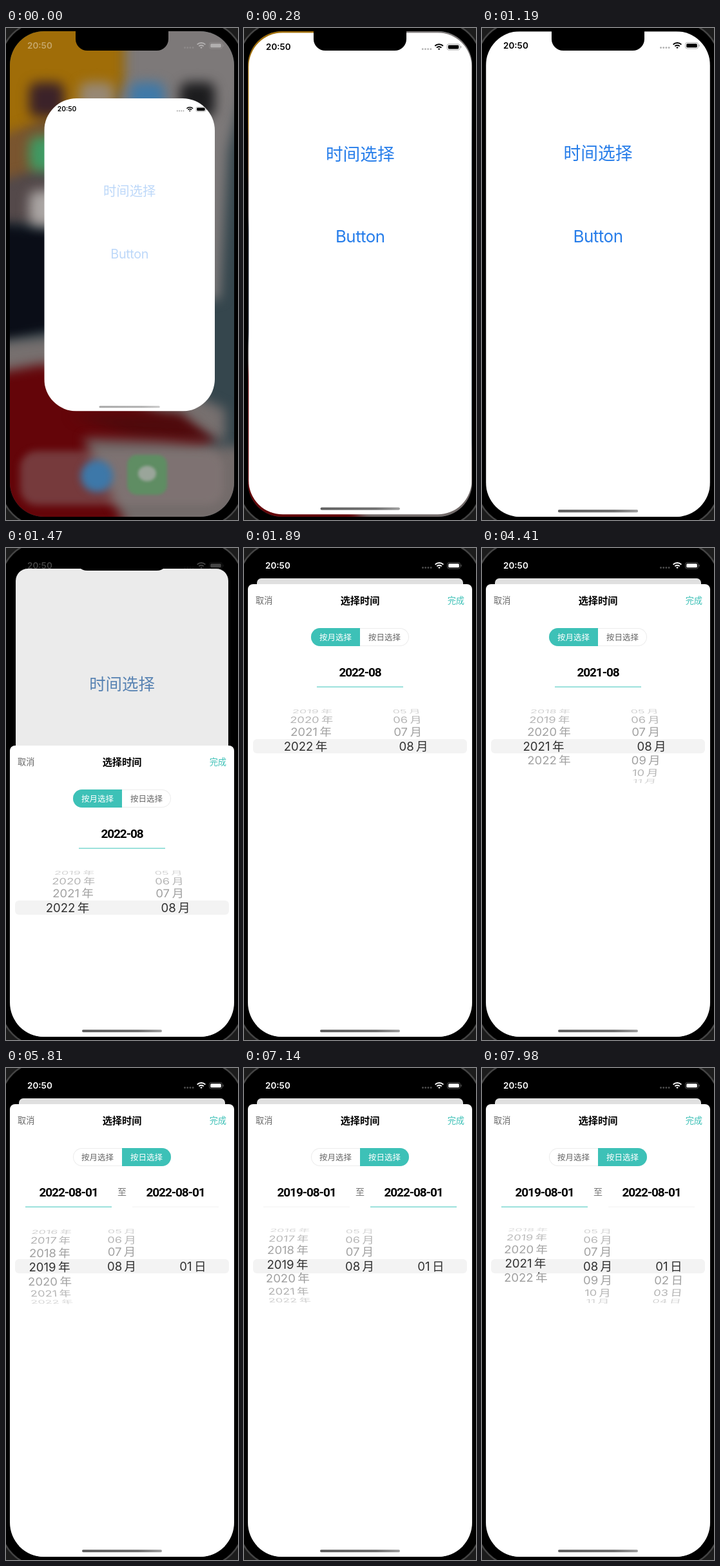
Write an HTML page with a canvas that moves like this. It is 360 px wide and 762 px high and loops after 8000 ms.

```html
<!DOCTYPE html>
<html lang="zh">
<head>
<meta charset="utf-8">
<title>时间选择</title>
<style>
  html, body { margin: 0; height: 100%; overflow: hidden; background: #000; }
  canvas { display: block; }
</style>
</head>
<body>
<canvas id="stage" width="360" height="762"></canvas>
<script>
const ctx = document.getElementById('stage').getContext('2d');
const LOOP = 8000, STEP = 70;
const TEAL = '#3dc1b7', BLUE = [38, 125, 234];
const SANS = 'Inter, "Noto Sans CJK SC", "Noto Sans CJK", sans-serif';
const NUMERIC = 'Roboto, sans-serif';

const clamp = v => Math.min(1, Math.max(0, v));
const lerp = (a, b, p) => a + (b - a) * p;
const smooth = u => u * u * (3 - 2 * u);
const within = (t, a, b) => t >= a && t < b;
const pad = n => String(n).padStart(2, '0');

// Critically damped spring, normalised to reach 1 at u = 1
const damped = x => 1 - (1 + x) * Math.exp(-x);
const spring = u => damped(5.04 * clamp(u)) / damped(5.04);

function text(str, x, y, size, color, { weight = 400, family = SANS, align = 'center', spacing = 0 } = {}) {
  ctx.font = `${weight} ${size}px ${family}`;
  ctx.letterSpacing = spacing + 'px';
  ctx.textAlign = align;
  ctx.fillStyle = color;
  ctx.fillText(str, x, y + size * 0.365);
}

function box(x, y, w, h, r, color) {
  ctx.beginPath();
  ctx.roundRect(x, y, w, h, r);
  ctx.fillStyle = color;
  ctx.fill();
}

function blob(x, y, rx, ry, color) {
  ctx.beginPath();
  ctx.ellipse(x, y, rx, ry, 0, 0, 7);
  ctx.fillStyle = color;
  ctx.fill();
}

function polygon(color, ...points) {
  ctx.beginPath();
  for (let i = 0; i < points.length; i += 2) ctx.lineTo(points[i], points[i + 1]);
  ctx.fillStyle = color;
  ctx.fill();
}

function statusBar(color, alpha = 1) {
  ctx.save();
  ctx.globalAlpha = alpha;
  text('20:50', 33, 27, 13.5, color, { weight: 600, align: 'left' });
  ctx.globalAlpha = alpha * 0.3;
  for (let i = 0; i < 4; i++) blob(277.5 + i * 4.2, 30.5, 1.4, 1.4, color);
  ctx.strokeStyle = color;
  ctx.lineWidth = 1;
  ctx.beginPath();
  ctx.roundRect(315.5, 22.5, 20, 9.5, 3);
  ctx.stroke();
  box(336.5, 25.5, 1.3, 3.5, 1, color);
  ctx.globalAlpha = alpha;
  box(317.2, 24.2, 16.6, 6.1, 1.5, color);
  ctx.lineWidth = 2;
  for (const r of [1.5, 5.2, 9]) {
    ctx.beginPath();
    ctx.arc(303, 32, r, -Math.PI * 0.75, -Math.PI * 0.25);
    ctx.stroke();
  }
  ctx.restore();
}

function homeIndicator(x, y, scale = 1) {
  const w = 124 * scale;
  const shade = ctx.createLinearGradient(x - w / 2, 0, x + w / 2, 0);
  shade.addColorStop(0, '#606060');
  shade.addColorStop(0.7, '#707070');
  shade.addColorStop(1, '#a0a0a0');
  box(x - w / 2, y - 2 * scale, w, 4 * scale, 2 * scale, shade);
}

function homeScreen() {
  box(0, 0, 360, 762, 0, '#35464d');
  ctx.save();
  ctx.filter = 'blur(9px)';
  polygon('#7d7979', 170, -20, 380, -20, 375, 60, 345, 190, 332, 420, 300, 420, 170, 200);
  polygon('#a06d08', -20, -20, 184, -20, 184, 80, 150, 150, 60, 150, -20, 200);
  polygon('#7a552f', -20, 170, 70, 140, 70, 220, -20, 260);
  polygon('#54494a', -20, 240, 70, 215, 70, 300, -20, 310);
  polygon('#0a0d17', -20, 300, 90, 315, 90, 465, -20, 490);
  polygon('#77706f', -20, 488, 80, 478, 340, 590, 340, 640, 200, 610, -20, 545);
  polygon('#640509', -20, 535, 60, 520, 200, 580, 325, 640, 300, 660, 250, 780, -20, 780);
  polygon('#4f0a0c', 100, 600, 270, 595, 320, 640, 200, 632);
  polygon('#736b6a', 120, 636, 240, 640, 380, 650, 380, 780, 190, 780);
  box(36, 84, 54, 54, 13, '#3b2229');
  box(114, 84, 54, 54, 13, '#978874');
  box(192, 84, 54, 54, 13, '#3f79a8');
  box(270, 84, 54, 54, 13, '#1c1c1e');
  box(36, 168, 54, 54, 13, '#3f9a63');
  box(36, 252, 54, 54, 13, '#aaa5a3');
  ctx.filter = 'blur(6px)';
  box(22, 655, 316, 84, 26, 'rgba(140,125,125,.45)');
  blob(141, 694, 25, 25, '#3d78a9');
  ctx.filter = 'blur(2px)';
  box(188, 661, 62, 62, 15, '#5f8d63');
  blob(219, 690, 14, 12, '#9aa59a');
  ctx.restore();
  statusBar('#fff', 0.4);
}

function appView({ x, y, w, h, r, textAlpha = 1, away = 0, status = true }) {
  const scale = w / 348;
  const tint = BLUE.map((c, i) => lerp(c, [125, 150, 170][i], away));
  ctx.save();
  ctx.beginPath();
  ctx.roundRect(x, y, w, h, r);
  ctx.clip();
  box(x, y, w, h, 0, '#fff');
  ctx.save();
  ctx.translate(x, y);
  ctx.scale(scale, scale);
  ctx.translate(-6, -5);
  ctx.globalAlpha = textAlpha;
  text('时间选择', 180, 193.5, 26.8, `rgb(${tint})`);
  text('Button', 180, 322, 26, `rgb(${tint})`, { spacing: -0.5 });
  ctx.globalAlpha = 1;
  if (status) statusBar('#000');
  ctx.restore();
  ctx.globalAlpha = Math.sqrt(textAlpha);
  homeIndicator(x + w / 2, y + h - 9 * scale, scale);
  ctx.globalAlpha = 1;
  box(x, y, w, h, 0, `rgba(0,0,0,${0.12 * away})`);
  ctx.restore();
}

// Rows sit on a cylinder seen with slight perspective towards the centre line
const WHEEL_Y = 307, RADIUS = 60.4, PITCH = 0.372, DEPTH = 0.055;

function wheelRows({ value, min, max, label }, x, inBand) {
  for (let n = Math.max(min, Math.round(value) - 4); n <= Math.min(max, Math.round(value) + 4); n++) {
    const angle = (n - value) * PITCH;
    if (Math.abs(angle) > 1.4) continue;
    const cos = Math.cos(angle), sin = Math.sin(angle);
    const inward = (180 - x) * DEPTH;
    ctx.save();
    ctx.transform(1 - DEPTH * (1 - cos), 0, inward * sin / RADIUS, cos,
      x + inward * (1 - cos), WHEEL_Y + RADIUS * sin);
    text(label(n), 0, 0, 18.6, inBand ? '#303030' : `rgba(0,0,0,${0.4 * cos})`);
    ctx.restore();
  }
}

function wheel(column) {
  for (const inBand of [false, true]) {
    ctx.save();
    ctx.beginPath();
    if (inBand) ctx.rect(0, 296, 360, 22);
    else { ctx.rect(0, 247, 360, 49); ctx.rect(0, 318, 360, 48); }
    ctx.clip();
    wheelRows(column, inBand ? column.bandX : column.x, inBand);
    ctx.restore();
  }
}

const YEAR_KEYS = [
  [0, 2022], [2975, 2022], [3080, 2021.3], [3340, 2021.3], [3800, 2021],
  [4435, 2021], [4780, 2022], [5300, 2022], [5670, 2018.8], [5900, 2019],
  [7095, 2019], [7440, 2022], [7865, 2022], [8210, 2019]
];

function yearAt(t) {
  const i = YEAR_KEYS.findIndex(key => key[0] > t);
  const [t0, a] = YEAR_KEYS[i - 1], [t1, b] = YEAR_KEYS[i];
  return lerp(a, b, smooth((t - t0) / (t1 - t0)));
}

function segment(byDay) {
  box(104, 124, 152, 28, 14, '#ececec');
  box(105, 125, 150, 26, 13, '#fff');
  box(byDay ? 180 : 104, 124, 76, 28, byDay ? [0, 14, 14, 0] : [14, 0, 0, 14], TEAL);
  text('按月选择', 142, 138, 12.5, byDay ? '#666' : '#fff');
  text('按日选择', 218, 138, 12.5, byDay ? '#fff' : '#666');
}

function dateField(str, x, active) {
  text(str, x, 192.5, 19, '#000', { weight: 700, family: NUMERIC, spacing: -1.1 });
  box(x - 67, 214.4, 134, 1.3, 0, active ? '#62d0c7' : '#f4f4f4');
}

function sheet(t, top) {
  const byDay = t >= 4480;
  const second = within(t, 7140, 7910);
  const upToToday = t < 3850 || within(t, 4480, 5950) || second;

  ctx.save();
  ctx.translate(0, top - 56);
  box(6, 56, 348, 760, 8, '#fff');
  text('取消', 18, 81, 13.2, '#666', { align: 'left' });
  text('选择时间', 180, 81, 15.2, '#000', { weight: 700 });
  text('完成', 342, 81, 13.2, TEAL, { align: 'right' });
  segment(byDay);

  if (byDay) {
    dateField(t < 5950 ? '2022-08-01' : '2019-08-01', 97, !second);
    text('至', 180, 192, 14, '#777');
    dateField('2022-08-01', 263, second);
  } else {
    dateField(t < 3850 ? '2022-08' : '2021-08', 180, true);
  }

  box(14, 296, 332, 22, 6, '#f3f3f3');
  const year = { value: yearAt(t), min: 2000, max: 2022, label: n => n + '\u2009年' };
  const month = { value: 8, min: 1, max: upToToday ? 8 : 12, label: n => pad(n) + '\u2009月' };
  const day = { value: 1, min: 1, max: upToToday ? 1 : 31, label: n => pad(n) + '\u2009日' };
  if (byDay) {
    wheel({ ...year, x: 67.5, bandX: 67.5 });
    wheel({ ...month, x: 179.5, bandX: 179.5 });
    wheel({ ...day, x: 290, bandX: 290 });
  } else {
    wheel({ ...year, x: 103.7, bandX: 95.5 });
    wheel({ ...month, x: 254.5, bandX: 263 });
  }
  ctx.restore();
}

function bezel() {
  box(0, 0, 360, 762, 0, '#1c1c1c');
  box(-8, -9, 376, 780, 62, '#000');
  ctx.strokeStyle = '#444';
  ctx.lineWidth = 2.5;
  ctx.stroke();
}

function notch() {
  box(108, 0, 144, 35, [0, 0, 18, 18], '#000');
}

function draw(t) {
  bezel();
  ctx.save();
  ctx.beginPath();
  ctx.roundRect(6, 5, 348, 752, 53);
  ctx.clip();
  box(0, 0, 360, 762, 0, '#000');

  if (t < 1190) {
    const p = 1 - (1 - clamp(t / 560)) ** 5.5;
    if (p < 1) homeScreen();
    appView({
      x: lerp(59.3, 6, p), y: lerp(109, 5, p), w: lerp(264.7, 348, p), h: lerp(484.5, 752, p),
      r: lerp(50, 53, p), textAlpha: clamp(0.3 + t / 280)
    });
    notch();
  } else {
    const p = spring((t - 1171) / 719);
    const level = 255 * p ** 3;
    appView({
      x: lerp(6, 20, p), y: lerp(5, 47, p), w: lerp(348, 320, p), h: 752,
      r: lerp(40, 7, p), away: p, status: false
    });
    notch();
    statusBar(`rgb(${level},${level},${level})`);
    sheet(t, Math.floor(lerp(762, 56, p)));
    homeIndicator(180, 748);
  }
  ctx.restore();
}

let shown = -1;
const start = performance.now();
function tick() {
  const t = Math.floor((performance.now() - start) % LOOP / STEP) * STEP;
  if (t !== shown) draw(shown = t);
  requestAnimationFrame(tick);
}
tick();
</script>
</body>
</html>
```
